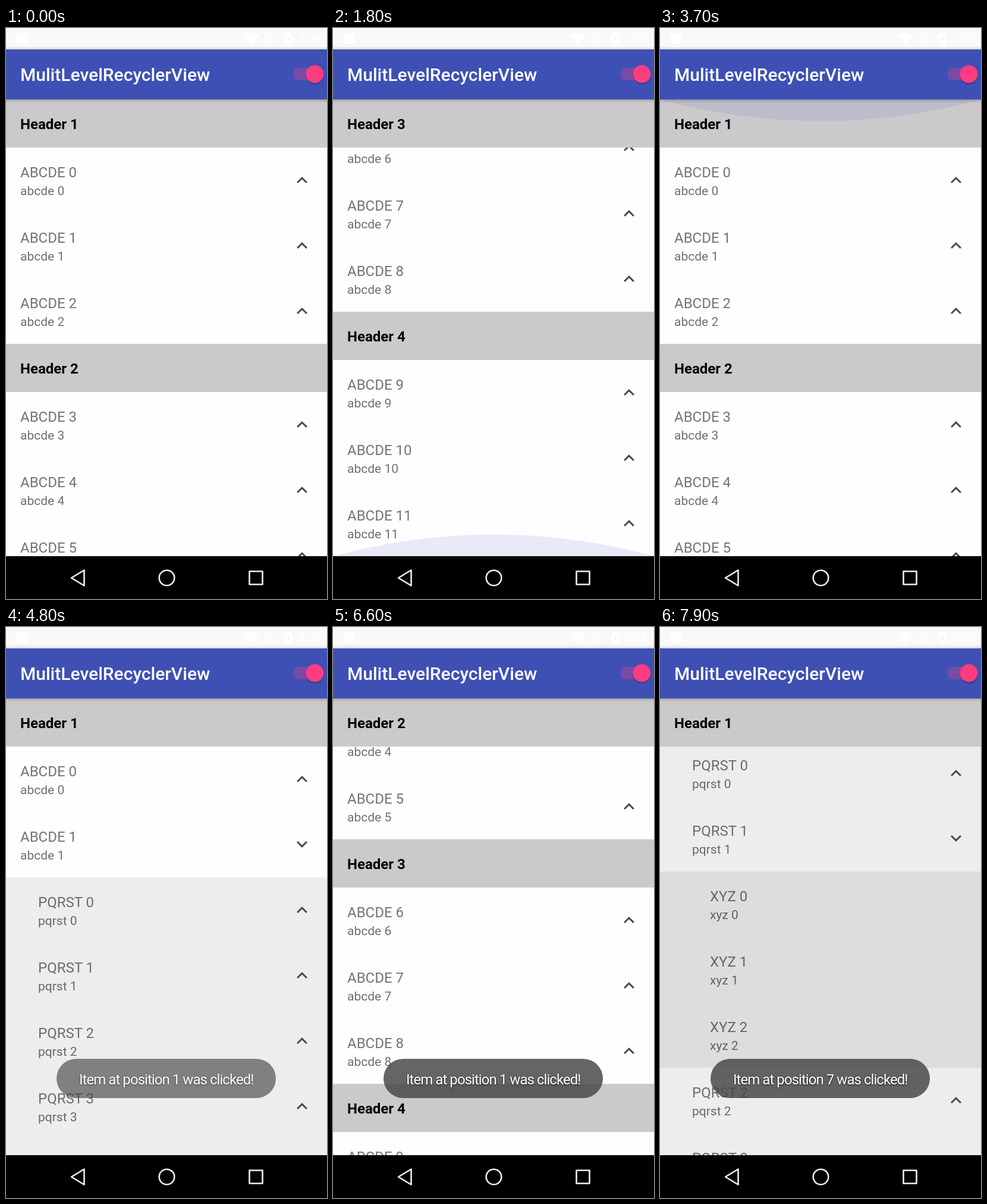
An HTML page that plays this animation: 540x960 px, repeating every 8 s.

```html
<!DOCTYPE html>
<html lang="en">
<head>
<meta charset="utf-8">
<title>MulitLevelRecyclerView</title>
<style>
  html, body { margin: 0; width: 100%; height: 100%; overflow: hidden; background: #fefdff; }
  svg { display: block; width: 100vw; height: 100vh; font-family: Roboto, sans-serif; }
  text { white-space: pre; }
  .head { font-size: 24px; font-weight: 700; }
  .name { font-size: 24px; fill: rgba(0, 0, 0, .54); }
  .sub { font-size: 21px; fill: rgba(0, 0, 0, .56); }
  .bar { font-size: 30px; font-weight: 500; fill: #fff; }
  .clock { font-size: 18px; fill: #fff; }
  .toast { font-size: 24px; letter-spacing: -.95px; fill: #fff; text-shadow: 0 1px 3px rgba(0, 0, 0, .75); }
</style>
</head>
<body>
<svg viewBox="0 0 540 960">
  <defs>
    <linearGradient id="shade" x1="0" y1="0" x2="0" y2="1">
      <stop offset="0" stop-color="#000" stop-opacity=".24"/>
      <stop offset=".4" stop-color="#000" stop-opacity=".07"/>
      <stop offset="1" stop-color="#000" stop-opacity="0"/>
    </linearGradient>
    <linearGradient id="rim" x1="0" y1="0" x2="0" y2="1">
      <stop offset="0" stop-color="#000" stop-opacity="0"/>
      <stop offset="1" stop-color="#000" stop-opacity=".14"/>
    </linearGradient>
    <clipPath id="rowClip"><rect width="540" height="110"/></clipPath>
  </defs>

  <rect width="540" height="960" fill="#fefdff"/>
  <g id="list"></g>
  <g id="ripple" clip-path="url(#rowClip)"><circle cx="293" cy="15"/></g>
  <g id="sticky">
    <rect width="540" height="81" fill="#cbc9cc"/>
    <text class="head" x="24" y="50"></text>
  </g>
  <path id="glow" fill="#3f51b5"/>

  <g id="toolbar">
    <rect width="540" height="36" fill="#faf9fa"/>
    <rect y="31" width="540" height="5" fill="url(#rim)"/>
    <g fill="#fff">
      <rect x="18" y="9" width="18" height="18" rx="4"/>
      <path d="M399 13Q412 3 426 13L412.500 28Z"/>
      <rect x="436" y="10" width="16" height="17" opacity=".35"/>
      <path d="M469 10h3.500v-2h5v2h3.500v18h-12z"/>
    </g>
    <path d="M476 13l-4 6h2.500v5l4-6.500h-2.500z" fill="#f3f2f3"/>
    <text class="clock" x="493" y="25">4:09</text>
    <rect y="36" width="540" height="84" fill="#3e50b4"/>
    <rect y="120" width="540" height="7" fill="url(#shade)"/>
    <text class="bar" x="24" y="89">MulitLevelRecyclerView</text>
    <rect x="484" y="67" width="50" height="21" rx="8" fill="#ff4081" opacity=".3"/>
    <circle cx="519.500" cy="79.500" r="15.500" opacity=".18"/>
    <circle cx="519.500" cy="77.500" r="15" fill="#fb3d80"/>
  </g>

  <g id="toast">
    <rect x="85" y="726" width="369" height="66" rx="33" fill="#454545" fill-opacity=".82"/>
    <text class="toast" x="123" y="769"></text>
  </g>

  <g id="finger">
    <circle r="18.500" fill="none" stroke="#a9a6dc" stroke-width="2" opacity=".25"/>
    <circle r="16.500" fill="#fff" fill-opacity=".65" stroke="#aaa8d8" stroke-width="1.600"/>
  </g>

  <rect y="888" width="540" height="72"/>
  <g fill="none" stroke="#eee" stroke-width="2.600" stroke-linejoin="round">
    <path d="M110 924.500L131.500 911.500V937.500Z"/>
    <circle cx="270.500" cy="924.500" r="12.800"/>
    <rect x="409.500" y="913.500" width="22" height="22"/>
  </g>
</svg>
<script>
const LOOP = 8000, STEP = 100, TOP = 120, BOTTOM = 888, HEAD = 81, ROW = 110;
const SVG = 'http://www.w3.org/2000/svg';
const $ = s => document.querySelector(s);

function add(parent, tag, attrs, text) {
  const node = document.createElementNS(SVG, tag);
  for (const key in attrs) node.setAttribute(key, attrs[key]);
  if (text) node.textContent = text;
  parent.append(node);
  return node;
}
const place = (node, x, y) => node.setAttribute('transform', `translate(${x} ${y})`);
const show = (node, on) => { node.style.display = on ? '' : 'none'; };
const clamp = v => Math.max(0, Math.min(1, v));
const ease = v => (1 - Math.cos(Math.PI * clamp(v))) / 2;

// piecewise linear track: [time, value], ...
function track(points, t) {
  let i = points.findIndex(p => p[0] > t);
  if (i < 0) return points[points.length - 1][1];
  if (!i) return points[0][1];
  const [t0, v0] = points[i - 1], [t1, v1] = points[i];
  return v0 + (v1 - v0) * (t - t0) / (t1 - t0);
}

const LEVELS = [
  { word: 'ABCDE', fill: '#fefdff' },
  { word: 'PQRST', fill: '#eeecee' },
  { word: 'XYZ', fill: '#dedcde' }
];
const UP = 'M12 8l-6 6 1.410 1.410L12 10.830l4.590 4.580L18 14z';
const DOWN = 'M16.590 8.590L12 13.170 7.410 8.590 6 10l6 6 6-6z';
const rows = [];

function addRow(level, n) {
  const node = add($('#list'), 'g', {}), x = 24 + 30 * level;
  const { word, fill } = LEVELS[level];
  add(node, 'rect', { width: 540, height: ROW, fill });
  add(node, 'text', { class: 'name', x, y: 50 }, `${word} ${n}`);
  add(node, 'text', { class: 'sub', x, y: 80 }, `${word.toLowerCase()} ${n}`);
  const arrow = level < 2 ? add(node, 'path', { fill: '#4a484b' }) : null;
  rows.push({ node, level, n, arrow, size: ROW });
}
function addHead(n) {
  const node = add($('#list'), 'g', {});
  add(node, 'rect', { width: 540, height: HEAD, fill: '#cbc9cc' });
  add(node, 'text', { class: 'head', x: 24, y: 50 }, `Header ${n}`);
  rows.push({ node, head: n, level: 0, size: HEAD });
}
for (let h = 0; h < 4; h++) {
  addHead(h + 1);
  for (let i = h * 3; i < h * 3 + 3; i++) {
    addRow(0, i);
    if (i !== 1) continue;
    for (let p = 0; p < 6; p++) {
      addRow(1, p);
      if (p === 1) for (let x = 0; x < 3; x++) addRow(2, x);
    }
  }
}

// rows below slide down first, then the new rows fade in
const opening = [null, { start: 4400, move: 250, fade: 120 }, { start: 5380, move: 150, fade: 70 }];
function openState(level, t) {
  if (!level) return { slide: 1, alpha: 1 };
  const { start, move, fade } = opening[level];
  return { slide: ease((t - start) / move), alpha: clamp((t - start - move) / fade) };
}

const scroll = [
  [900, 0], [1000, 20], [1100, 150], [1200, 310], [1300, 498], [1400, 650], [1500, 760], [1600, 838], [1700, 876],
  [3100, 876], [3200, 766], [3300, 500], [3400, 240], [3500, 75], [3600, 0],
  [6000, 0], [6100, 230], [6200, 533], [6300, 850], [6400, 1130], [6500, 1370], [6600, 1575], [6700, 1740], [6800, 1866],
  [7400, 1866], [7500, 1756], [7600, 1420], [7700, 1000], [7800, 600], [7900, 230]
];
const toastAlpha = [
  [4600, 0], [4700, .4], [4800, .79], [4900, .94], [5000, 1],
  [6600, 1], [6700, .6], [6800, .1], [6900, 0], [7000, 0], [7100, 1]
];
// one entry per step: height and strength of the touch dot
const touches = [
  { start: 900, x: 293, y: [737, 712, 580, 438, 438], alpha: [.8, 1, 1, .9, .35] },
  { start: 3100, x: 303, y: [392, 505, 680, 690], alpha: [.75, 1, .8, .25] },
  { start: 4300, x: 330, y: [358, 358], alpha: [.9, .45] },
  { start: 5400, x: 330, y: [564, 564], alpha: [.8, .3] },
  { start: 6000, x: 374, y: [770, 600, 490], alpha: [.8, 1, .6] },
  { start: 7400, x: 314, y: [510, 627, 760], alpha: [.8, 1, .4] }
];
const glows = [{ start: 1700, low: true }, { start: 3600 }, { start: 6800, low: true }];

function drawList(t) {
  const offset = track(scroll, t);
  const states = [0, 1, 2].map(level => openState(level, t));
  let y = TOP - offset, current = 1, next = Infinity;
  for (const row of rows) {
    const { slide, alpha } = states[row.level];
    // new rows stand still at their final place while the rest moves
    const shift = row.level ? y : Math.round(y);
    show(row.node, alpha > 0 && shift < BOTTOM && shift + row.size > TOP);
    row.node.style.opacity = alpha;
    place(row.node, 0, shift);
    if (row.arrow) {
      const open = row.n === 1 && row.level < 2 && t >= opening[row.level + 1].start;
      row.arrow.setAttribute('d', open ? DOWN : UP);
      row.arrow.setAttribute('transform', `translate(480 ${open ? 36 : 37}) scale(1.5)`);
    }
    if (row.head) {
      if (y <= TOP) current = row.head;
      else next = Math.min(next, y);
    }
    y += row.size * slide;
  }
  place($('#sticky'), 0, Math.min(TOP, next - HEAD));
  $('#sticky text').textContent = `Header ${current}`;

  const press = (t - 900) / 400;
  show($('#ripple'), press > 0 && press <= 1);
  place($('#ripple'), 0, 722 - offset);
  $('#ripple circle').setAttribute('r', 100 + 179 * clamp(press));
  $('#ripple circle').setAttribute('opacity', .04 - .024 * clamp(press));
}

function drawGlow(t) {
  const hit = glows.find(g => t >= g.start && t < g.start + 200);
  show($('#glow'), hit);
  if (!hit) return;
  const left = 1 - (t - hit.start) / 200;
  const edge = hit.low ? BOTTOM : TOP, peak = 104 * (.4 + .6 * left);
  $('#glow').setAttribute('d', `M0 ${edge}Q270 ${edge + (hit.low ? -peak : peak)} 540 ${edge}Z`);
  $('#glow').setAttribute('opacity', .22 * left);
}

function drawFinger(t) {
  const touch = touches.find(d => t >= d.start && t < d.start + d.y.length * STEP);
  show($('#finger'), touch);
  if (!touch) return;
  const i = (t - touch.start) / STEP;
  place($('#finger'), touch.x, touch.y[i]);
  $('#finger').style.opacity = touch.alpha[i];
}

function draw(now) {
  const t = Math.floor(now % LOOP / STEP) * STEP;
  drawList(t);
  drawGlow(t);
  drawFinger(t);
  $('#toast').style.opacity = track(toastAlpha, t);
  $('#toast text').textContent = `Item at position ${t < 7000 ? 1 : 7} was clicked!`;
}
function tick() {
  draw(performance.now());
  requestAnimationFrame(tick);
}
tick();
</script>
</body>
</html>
```
